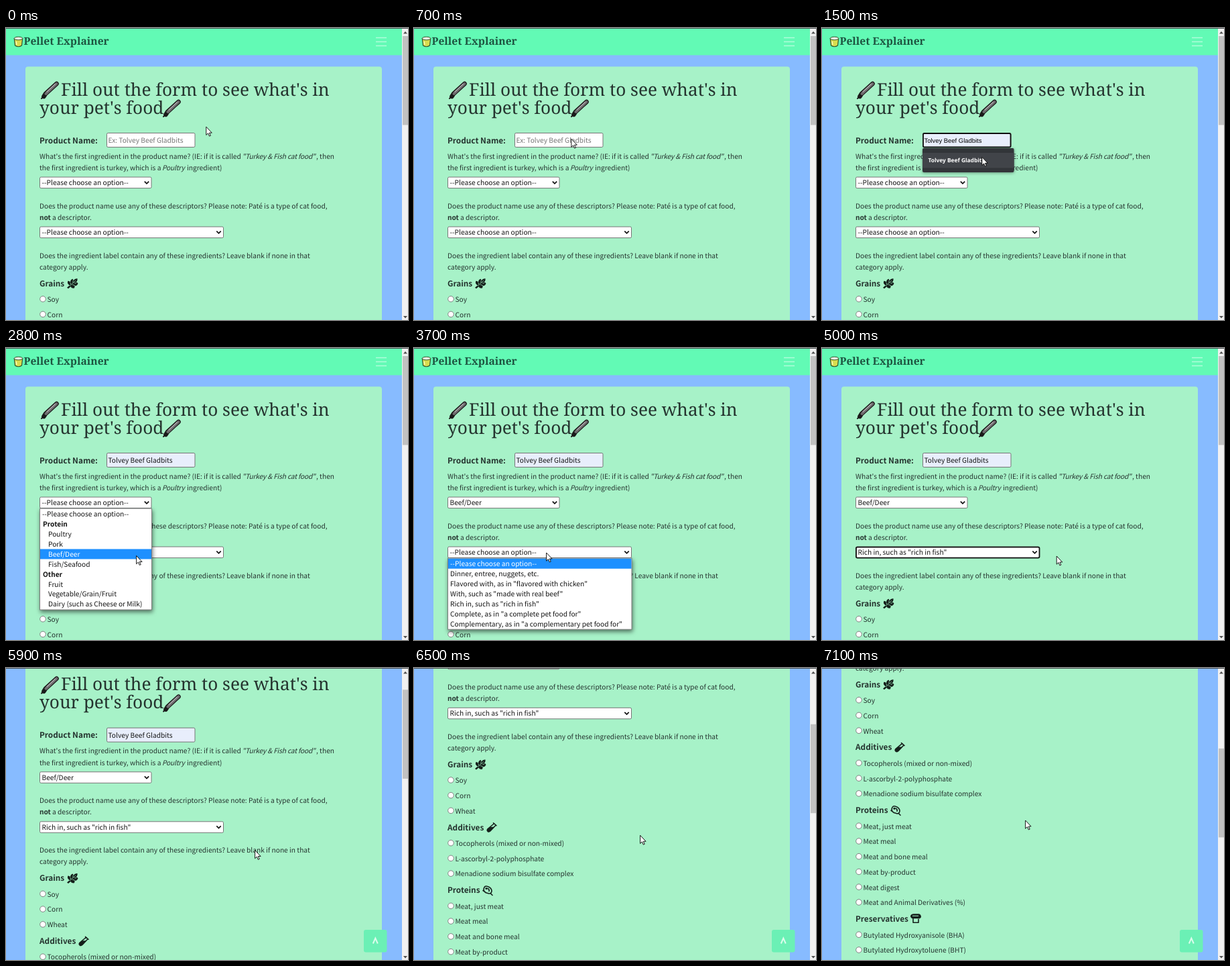
An HTML page that plays this animation: 600 by 435 pixels, repeating every 7.2 s.

```html
<!DOCTYPE html>
<html lang="en">
<head>
<meta charset="utf-8">
<title>Pellet Explainer</title>
<style>
  html, body { margin: 0; width: 100%; height: 100%; overflow: hidden; background: #87bbff; }
  svg { display: block; width: 600px; height: 435px; }
  text {
    font: 10.2px "Noto Sans CJK JP", "Noto Sans CJK SC", "Noto Sans CJK", "Open Sans", sans-serif;
    fill: #25342f; white-space: pre; text-rendering: geometricPrecision;
  }
  .b { font-weight: 700; }
  .i { font-style: italic; letter-spacing: -.18px; }
  .label { font-size: 11.8px; font-weight: 700; }
  .ctl { fill: #141414; }
  .hint { fill: #757575; }
  .on { fill: #fff; }
  .brand { font: 700 15.6px "Noto Serif", serif; fill: #1d5440; }
  .title { font: 26.2px "Noto Serif", serif; }
  .plain { font: 9.44px "Liberation Sans", Arial, sans-serif; fill: #000; }
  .tip { font: 700 8.4px "Noto Sans", sans-serif; fill: #fff; }
  .box { fill: #fff; stroke: #767676; }
  .ring { fill: none; stroke: #101010; stroke-width: 1.8; }
  .list { fill: #fff; stroke: #7a7a7a; filter: drop-shadow(1px 3px 3px #0008); }
  .ink { fill: #15201b; }
  .line { fill: none; stroke: #15201b; stroke-width: 1.6; stroke-linecap: round; stroke-linejoin: round; }
</style>
</head>
<body>
<svg id="stage" viewBox="0 0 600 435">
  <defs>
    <g id="pen" fill="none" stroke-linecap="round" stroke-linejoin="round">
      <path d="M3.500 22.500L6 18.500L22.500 3.500" stroke="#1b1b1b" stroke-width="6.600"/>
      <path d="M0 25.500L4 22" stroke="#1b1b1b" stroke-width="2"/>
      <path d="M6.500 18.500L22.500 3.500" stroke="#706d70" stroke-width="4"/>
      <path d="M8 15.500L20.500 4" stroke="#b0abae" stroke-width="1.300"/>
    </g>
    <g id="chevron"><path d="M-3.2 -1.6L0 1.6L3.2 -1.6" fill="none" stroke="#111" stroke-width="1.7"/></g>
    <g id="grain">
      <path class="ink" d="M0 14L4 10.500Q-.500 8 1.500 4Q4 4 5 6Q5 2 8.500 1Q9.500 2 9.500 3.500Q12 0 15.500 .500Q16 4 13.500 6Q16 6 16.500 8Q15 11.500 11.500 11.500Q12 13 10.500 15Q6.500 15 5.500 12.500L2 15.500Z"/>
      <path d="M4 11.500L13 3.500M5 6.500L6 9.500M9 3.500V7M8 9.500L12 11M11 7L14 7.500" stroke="#a7f2c8" stroke-width=".7"/>
    </g>
    <g id="tube">
      <path class="line" d="M10.500 1L15 5M11.500 2L2 10Q.500 12 2 13.500Q4 15 6 13L14 4.500"/>
      <path class="ink" d="M6 7H12L6 13Q3.500 15 2 13T2 10Z"/>
    </g>
    <g id="meat">
      <path class="line" d="M2 6Q3 0 8 2Q14 4 14 9Q13 14 8 12Q2 11 2 6ZM12 12L15 15M4 10L1 8M8 5Q11 6 10 9"/>
      <circle class="ink" cx="6" cy="5" r="1.6"/>
    </g>
    <g id="jar">
      <path class="ink" d="M0 3Q1 0 5 0H13Q16 1 16 5L14 7H3Q0 6 0 3Z"/>
      <path class="line" d="M4 6V13H12V8"/>
      <path d="M3 3H12" stroke="#a7f2c8"/>
    </g>
  </defs>

  <rect width="600" height="435" fill="#87bbff"/>
  <g id="page">
    <rect width="591" height="40.500" fill="#62fab5"/>
    <path d="M12.300 15.500H24.700L23.500 26Q18.500 29.500 13.500 26Z" fill="#d9dc4e" stroke="#34502f" stroke-width="1.200"/>
    <ellipse cx="18.500" cy="15.500" rx="6.200" ry="2.300" fill="#f7f8e6" stroke="#34502f"/>
    <path d="M15 20L16 25" stroke="#fff8b8" stroke-width="1.500"/>
    <path d="M552 14.500H568M552 20.500H568M552 26.500H568" stroke="#b0fddb" stroke-width="1.400"/>
    <rect x="29" y="57.500" width="532" height="1300" rx="4" fill="#a7f2c8"/>
    <use href="#pen" x="53" y="79.500"/>
    <use href="#pen" x="235" y="106.500"/>
  </g>

  <g id="toTop">
    <rect x="534" y="390" width="34.500" height="33.500" rx="3" fill="#6bf0b5"/>
    <path d="M547.800 410.500L551.300 402.500L554.800 410.500" fill="none" stroke="#dcfcec" stroke-width="2"/>
  </g>
  <rect x="591" width="9" height="435" fill="#f1f1f1"/>
  <rect id="thumb" x="592" y="12" width="8" height="132.500" fill="#c1c1c1"/>
  <path d="M593 8.500L596 5L599 8.500ZM593 429L596 432.500L599 429Z" fill="#505050"/>
  <rect width="600" height="1" fill="#4a5052"/>
  <path id="cursor" d="M0 0V12.200L2.800 9.600L4.700 13.900L6.600 13.100L4.700 9H8.500Z" fill="#fff" stroke="#000" stroke-width=".9"/>
</svg>
<script>
const LOOP = 7200, STEP = 100, ROW = 14.93;
const NAME = 'Tolvey Beef Gladbits', NONE = '--Please choose an option--';
const $ = id => document.getElementById(id);
const page = $('page');

function add(tag, attrs, parent = page) {
  const el = document.createElementNS('http://www.w3.org/2000/svg', tag);
  for (const k in attrs) el.setAttribute(k, attrs[k]);
  return parent.appendChild(el);
}
function write(x, y, str, cls = '', parent = page) {
  const el = add('text', { x, y, class: cls }, parent);
  el.textContent = str;
  return el;
}
const box = (x, y, width, height, cls, parent) =>
  add('rect', { x, y, width, height, rx: cls === 'list' ? 0 : 1.8, class: cls }, parent);

// Headings and running text
write(26.5, 25.3, 'Pellet Explainer', 'brand');
write(82, 100.7, "Fill out the form to see what's in", 'title');
write(50, 127.7, "your pet's food", 'title');
write(50, 171.5, 'Product Name:', 'label');
write(50, 194.8, "What's the first ingredient in the product name? (IE: if it is called ");
write(352.5, 194.8, '"Turkey & Fish cat food"', 'i');
write(463, 194.8, ', then');
write(50, 212, 'the first ingredient is turkey, which is a ');
write(233, 212, 'Poultry', 'i');
write(270, 212, 'ingredient)');
write(50, 268.8, 'Does the product name use any of these descriptors? Please note: Paté is a type of cat food,');
write(50, 285.8, 'not', 'b');
write(69, 285.8, 'a descriptor.');
write(50, 342.8, 'Does the ingredient label contain any of these ingredients? Leave blank if none in that');
write(50, 359.8, 'category apply.');

// Radio groups
const groups = [
  ['Grains', 'grain', 91, ['Soy', 'Corn', 'Wheat']],
  ['Additives', 'tube', 108, ['Tocopherols (mixed or non-mixed)', 'L-ascorbyl-2-polyphosphate',
    'Menadione sodium bisulfate complex']],
  ['Proteins', 'meat', 102, ['Meat, just meat', 'Meat meal', 'Meat and bone meal', 'Meat by-product',
    'Meat digest', 'Meat and Animal Derivatives (%)']],
  ['Preservatives', 'jar', 132, ['Butylated Hydroxyanisole (BHA)', 'Butylated Hydroxytoluene (BHT)']]
];
let y = 380.3;
for (const [head, icon, x, items] of groups) {
  write(50, y + 4.3, head, 'label');
  add('use', { href: '#' + icon, x, y: y - 7.5 });
  y += 23.8;
  for (const item of items) {
    add('circle', { cx: 55, cy: y - .4, r: 4.3, class: 'box', 'stroke-width': .9 });
    write(61.5, y + 3.9, item);
    y += 22.75;
  }
  y += 1.7;
}

// Name field
const field = box(150.5, 156.5, 131.5, 21, 'box');
const fieldRing = box(151, 157, 130.5, 20.5, 'ring');
const hint = write(152.5, 171.3, 'Ex: ' + NAME, 'hint');
const preview = write(152.5, 171, NAME, 'plain');
const value = write(152.5, 171.3, NAME, 'ctl');
const tip = add('g');
add('rect', { x: 150, y: 179, width: 136.5, height: 36, rx: 2, fill: '#323539',
  style: 'filter: drop-shadow(0 1px 2px #0006)' }, tip);
const tipRow = add('rect', { x: 150, y: 186, width: 136.5, height: 22.5, fill: '#414449' }, tip);
write(158.5, 200.3, NAME, 'tip', tip);

// Select boxes with their option lists; a leading '#' marks a group label, '>' an indented option
function select(top, width, options) {
  box(50.5, top + .5, width - 1, 16.5, 'box');
  add('use', { href: '#chevron', x: 50 + width - 7.5, y: top + 8.7 });
  const label = write(53.5, top + 12.5, NONE, 'ctl');
  const ring = box(51, top + 1, width - 1.5, 16, 'ring');
  return { top, width, options, label, ring };
}
function optionList(sel) {
  const { top, width, options } = sel, start = top + 17.5;
  sel.start = start + .7;
  sel.list = add('g');
  box(50.5, start, width - .5, options.length * ROW + 1.6, 'list', sel.list);
  sel.bar = add('rect', { x: 51, width: width - 1.5, height: ROW, fill: '#1e90ff' }, sel.list);
  sel.rows = options.map((o, i) => {
    const kind = o[0], x = kind === '#' ? 55 : kind === '>' ? 63 : 54;
    return write(x, sel.start + i * ROW + 11.2, o.replace(/^[#>]/, ''), kind === '#' ? 'ctl b' : 'ctl', sel.list);
  });
}
const first = select(221.6, 167.5, [NONE, '#Protein', '>Poultry', '>Pork', '>Beef/Deer', '>Fish/Seafood',
  '#Other', '>Fruit', '>Vegetable/Grain/Fruit', '>Dairy (such as Cheese or Milk)']);
const second = select(295.6, 275, [NONE, 'Dinner, entree, nuggets, etc.',
  'Flavored with, as in "flavored with chicken"', 'With, such as "made with real beef"',
  'Rich in, such as "rich in fish"', 'Complete, as in "a complete pet food for"',
  'Complementary, as in "a complementary pet food for"']);
optionList(first);
optionList(second);

// Motion: [time, values...]
const cursorPath = [[0, 298.8, 147.2], [800, 232, 166], [1000, 230, 167], [1200, 230, 167], [1500, 238.8, 192.3],
  [1700, 238.8, 192.3], [2300, 205, 230], [2400, 204, 231], [2800, 194.6, 309.5], [3000, 194, 307],
  [3500, 197.6, 305], [3700, 197.6, 305], [4300, 202, 380], [4400, 203, 381], [5000, 350.2, 310],
  [5400, 371.6, 271.5], [5900, 371.6, 271.5], [7100, 303.6, 227]];
const scrollPath = [[5700, 0], [5800, 30], [5900, 67.3], [6200, 142], [6700, 300], [6900, 356]];

function at(path, t, ease = k => k) {
  const n = path.findIndex(p => p[0] > t);
  if (n < 0) return path[path.length - 1].slice(1);
  if (n === 0) return path[0].slice(1);
  const a = path[n - 1], b = path[n], k = ease((t - a[0]) / (b[0] - a[0]));
  return a.slice(1).map((v, i) => v + (b[i + 1] - v) * k);
}
const smooth = k => k * k * (3 - 2 * k);
const show = (el, on) => el.setAttribute('visibility', on ? 'visible' : 'hidden');

function drawSelect(sel, t, open, pick, blur, choice, cy) {
  sel.label.textContent = t < pick ? NONE : choice;
  show(sel.ring, t >= pick && t < blur);
  const isOpen = t >= open && t < pick;
  sel.list.style.display = isOpen ? '' : 'none';
  if (!isOpen) return;
  let row = Math.floor((cy - sel.start) / ROW);
  row = Math.max(0, Math.min(sel.rows.length - 1, row));
  if (sel.options[row][0] === '#') row--;
  sel.bar.setAttribute('y', sel.start + row * ROW);
  sel.rows.forEach((el, i) => el.classList.toggle('on', i === row));
}

function draw(t) {
  const [cx, cy] = at(cursorPath, t, smooth), [scroll] = at(scrollPath, t);
  const hover = t >= 1400 && t < 1700;
  $('cursor').setAttribute('transform', `translate(${cx} ${cy})`);
  page.setAttribute('transform', `translate(0 ${-scroll})`);
  $('thumb').setAttribute('y', 12 + scroll * .303);
  show($('toTop'), scroll > 0);

  field.style.fill = t >= 1400 ? '#e8eefc' : '#fff';
  show(fieldRing, t >= 900 && t < 2400);
  show(hint, t < 1400);
  show(preview, hover);
  show(value, t >= 1700);
  tip.style.display = t >= 900 && t < 1700 ? '' : 'none';
  show(tipRow, hover);

  drawSelect(first, t, 2400, 3000, 3500, 'Beef/Deer', cy);
  drawSelect(second, t, 3500, 4400, 5400, 'Rich in, such as "rich in fish"', cy);
}

const begin = performance.now();
function tick() {
  const t = (performance.now() - begin) % LOOP;
  draw(Math.floor(t / STEP) * STEP);
  requestAnimationFrame(tick);
}
tick();
</script>
</body>
</html>
```
